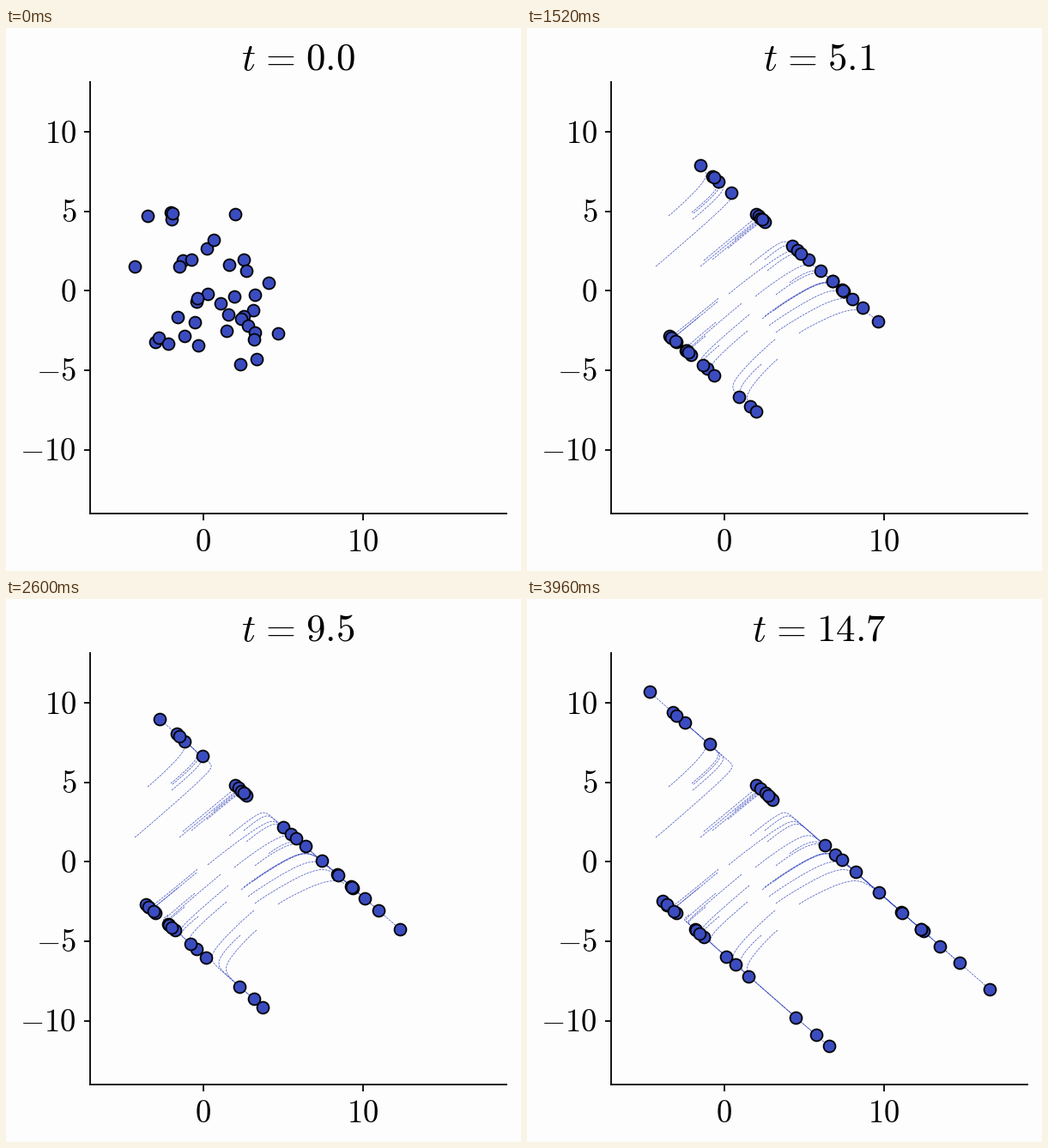
These frames come from a looping animation (600 by 633 pixels, 4 s). A matplotlib script:

```python
import matplotlib.pyplot as plt
import numpy as np
from matplotlib.animation import FuncAnimation
from matplotlib.collections import LineCollection

plt.rcParams["mathtext.fontset"] = "cm"

W, H, DPI = 600, 633, 100
BLUE, PAPER = "#3b4cc0", "#fdfdfd"
FRAMES, INTERVAL = 100, 40

STEP, LAST, SUB = 0.396, 37, 4      # time per state, last state, trail detail
GROWTH, PULL, DELAY = 0.0678, 1.4, 0.75
ALONG = np.array([1, 0.8745])       # direction in which the lines spread
ACROSS = np.array([1, -0.83])       # direction of approach to a line

# Starting points in pixels; the first of each group is its fixed leader.
UPPER = [
    (267, 217), (150, 278), (165, 219), (192, 215), (193, 223), (194, 216),
    (206, 271), (202, 278), (216, 270), (234, 257), (242, 247), (260, 276),
    (277, 270), (280, 283), (306, 297), (235, 310), (266, 313), (290, 311),
    (288, 329), (277, 336), (274, 339), (282, 347), (290, 355), (317, 356),
]
LOWER = [
    (174, 366), (222, 319), (223, 315), (200, 337), (178, 361), (189, 368),
    (208, 359), (220, 343), (224, 370), (250, 321), (259, 334), (257, 353),
    (289, 363), (273, 392), (292, 386),
]


def trajectories(starts):
    """Each point closes in on the leader's line and drifts away along it."""
    t = np.arange(LAST * SUB + 1)[:, None, None] * STEP / SUB
    starts = np.array(starts, float)
    leader = starts[0]
    basis = np.column_stack([ACROSS, ALONG])
    p, q = np.linalg.solve(basis, (starts - leader).T)[:, :, None]
    lag = 0.4 + (p**2 + q**2) / 50**2
    approach = 1 / (1 + (np.exp(PULL * t) - 1) / lag)
    drift = np.exp(GROWTH * (t - DELAY * (1 - np.exp(-t / DELAY))))
    return leader + p * approach * ACROSS + q * drift * ALONG


def state_at(frame):
    picture = int(0.8 * frame + 0.3)
    picture = min(picture, max(61, picture - 2))   # brief stall
    return max(0, (picture - 3) // 2)


paths = np.concatenate([trajectories(UPPER), trajectories(LOWER)], axis=1)

fig = plt.figure(figsize=(W / DPI, H / DPI), dpi=DPI, facecolor=PAPER)
ax = fig.add_axes([0, 0, 1, 1])
ax.set(xlim=(0, W), ylim=(H, 0))
ax.axis("off")


def rule(xs, ys):
    ax.plot(xs, ys, color="black", lw=1.3, solid_capstyle="butt", zorder=1)


def label(x, y, text, size, ha="center"):
    return ax.text(x, y, text, size=size, ha=ha, va="baseline", color="black")


LEFT, BOTTOM = 98, 566
rule([LEFT, LEFT], [62, BOTTOM + 1])
rule([LEFT - 1, 584], [BOTTOM, BOTTOM])
for value in range(-10, 11, 5):
    y = 306.3 - 18.52 * value
    rule([LEFT - 7.5, LEFT], [y, y])
    label(82, y + 12.5, f"${value}$", 26.4, "right")
for value in (0, 10):
    x = 230.4 + 18.53 * value
    rule([x, x], [BOTTOM, BOTTOM + 8])
    label(x - 0.5, 610, f"${value}$", 26.4)

title = label(340.5, 49.5, "", 32.3)
trails = LineCollection([], colors=BLUE, linewidths=0.5, linestyles="--", zorder=2)
ax.add_collection(trails)
dots, = ax.plot([], [], "o", ms=10, mfc=BLUE, mec="black", mew=1.3, zorder=3)


def draw(frame):
    state = state_at(frame)
    now = state * SUB
    title.set_text(rf"$t\hspace{{0.11}}=\hspace{{0.11}}{state * STEP:.1f}$")
    trails.set_segments(list(paths[:now + 1].swapaxes(0, 1)) if now else [])
    dots.set_data(paths[now, :, 0], paths[now, :, 1])
    return title, trails, dots


anim = FuncAnimation(fig, draw, frames=FRAMES, interval=INTERVAL,
                     repeat=True, repeat_delay=0, blit=False)
plt.show()
```
